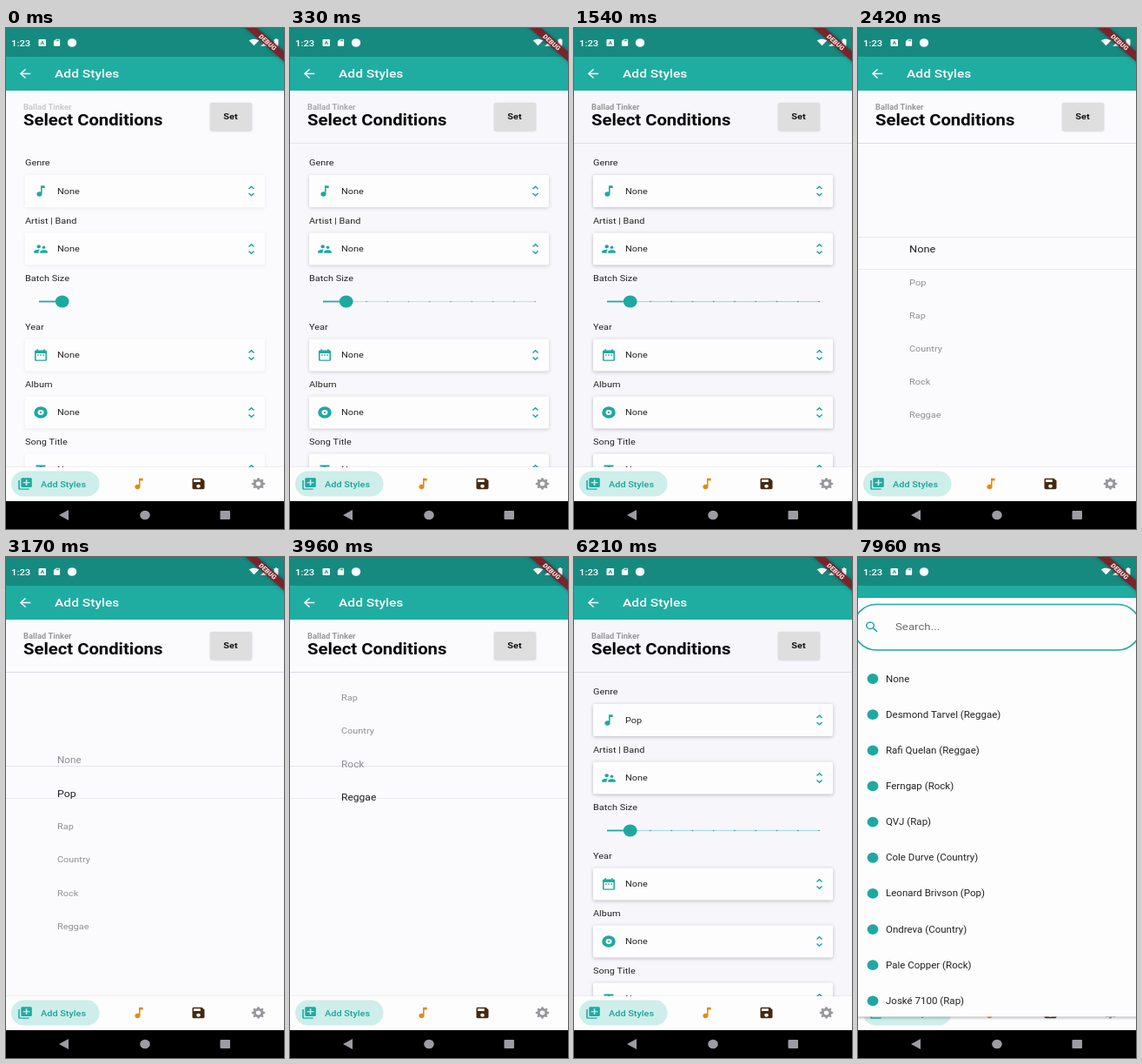
An HTML page with a canvas that plays this animation: 320 by 576 pixels, repeating every 8 s.

```html
<!DOCTYPE html>
<html lang="en">
<head>
<meta charset="utf-8">
<title>Add Styles</title>
<style>
html, body { margin: 0; width: 100%; height: 100%; overflow: hidden; background: #000; }
canvas { display: block; width: 320px; height: 576px; }
</style>
</head>
<body>
<canvas id="stage"></canvas>
<script>
const W = 320, H = 576, LOOP = 8000;
// The phone screen is 411 x 845 dp, squeezed into the stage.
const SX = W / 411, SY = H / 845;
const FONT = 'Roboto, "Open Sans", sans-serif';
const TEAL = '#1ea9a0', INK = '#232325';

const canvas = document.getElementById('stage');
const ctx = canvas.getContext('2d');
const dpr = window.devicePixelRatio || 1;
canvas.width = W * dpr;
canvas.height = H * dpr;

const ICONS = {
  back: 'M20 11H7.83l5.59-5.59L12 4l-8 8 8 8 1.41-1.41L7.83 13H20v-2z',
  note: 'M12 3v10.55c-.59-.34-1.27-.55-2-.55-2.21 0-4 1.79-4 4s1.79 4 4 4 4-1.79 4-4V7h4V3h-6z',
  people: 'M16.5 12a2.5 2.5 0 1 0 0-5a2.5 2.5 0 1 0 0 5zM9 11a3 3 0 1 0 0-6a3 3 0 1 0 0 6zm7.5 3c-1.83 0-5.5.92-5.5 2.75V19h11v-2.25c0-1.83-3.67-2.75-5.5-2.75zM9 13c-2.33 0-7 1.17-7 3.5V19h7v-2.25c0-.85.33-2.34 2.37-3.47C10.5 13.1 9.66 13 9 13z',
  date: 'M9 11H7v2h2zm4 0h-2v2h2zm4 0h-2v2h2zm2-7h-1V2h-2v2H8V2H6v2H5c-1.1 0-2 .9-2 2v14c0 1.1.9 2 2 2h14c1.1 0 2-.9 2-2V6c0-1.1-.9-2-2-2zm0 16H5V9h14z',
  album: 'M12 2a10 10 0 1 0 0 20a10 10 0 1 0 0-20zm0 5.5a4.5 4.5 0 1 1 0 9a4.5 4.5 0 1 1 0-9zm0 3a1.5 1.5 0 1 0 0 3a1.5 1.5 0 1 0 0-3z',
  title: 'M5 4v3h5.5v12h3V7H19V4z',
  unfold: 'M12 5.83L15.17 9l1.41-1.41L12 3 7.41 7.59 8.83 9zm0 12.34L8.83 15l-1.41 1.41L12 21l4.59-4.59L15.17 15z',
  add: 'M4 6H2v14c0 1.1.9 2 2 2h14v-2H4zm16-4H8c-1.1 0-2 .9-2 2v12c0 1.1.9 2 2 2h12c1.1 0 2-.9 2-2V4c0-1.1-.9-2-2-2zm-1 9h-4v4h-2v-4H9V9h4V5h2v4h4z',
  save: 'M17 3H5c-1.1 0-2 .9-2 2v14c0 1.1.9 2 2 2h14c1.1 0 2-.9 2-2V7zm-5 16a3 3 0 1 1 0-6a3 3 0 1 1 0 6zm3-10H5V5h10z',
  search: 'M15.5 14h-.8l-.3-.3A6.5 6.5 0 1 0 13.7 14.4l.3.3v.8l5 5L20.5 19zM9.5 14a4.5 4.5 0 1 1 0-9a4.5 4.5 0 1 1 0 9z',
  card: 'M18 2h-8L4 8v12c0 1.1.9 2 2 2h12c1.1 0 2-.9 2-2V4c0-1.1-.9-2-2-2zm-6 6h-2V4h2zm3 0h-2V4h2zm3 0h-2V4h2z',
  wifi: 'M12 21L0 7C7 2 17 2 24 7z',
  signal: 'M2 22h20V2z',
  battery: 'M16 4h-2V2h-4v2H8c-.6 0-1 .4-1 1v16c0 .6.4 1 1 1h8c.6 0 1-.4 1-1V5c0-.6-.4-1-1-1z',
  gear: gearPath(8)
};
for (const k in ICONS) ICONS[k] = new Path2D(ICONS[k]);

const FIELDS = [
  ['Genre', 155, 187.5, 'note'],
  ['Artist | Band', 221.5, 254, 'people'],
  ['Year', 343.5, 376, 'date'],
  ['Album', 409.5, 442, 'album'],
  ['Song Title', 475.5, 508, 'title']
];
const GENRES = ['None', 'Pop', 'Rap', 'Country', 'Rock', 'Reggae'];
const ARTISTS = ['None', 'Desmond Tarvel (Reggae)', 'Rafi Quelan (Reggae)', 'Ferngap (Rock)', 'QVJ (Rap)',
  'Cole Durve (Country)', 'Leonard Brivson (Pop)', 'Ondreva (Country)', 'Pale Copper (Rock)', 'Joské 7100 (Rap)'];
const PICK_Y = 258.5, STEP = 38.1;
// Height of the first genre over time while the finger drags the list.
const DRAG = [[2290, 258.5], [2670, 246], [3040, 246], [3170, 234], [3830, 104], [3880, 104], [4040, 68],
  [4250, 68], [4830, 181.5], [5000, 197], [5170, 197], [5330, 208], [5630, 208], [5830, 220]];

function gearPath(teeth) {
  let d = '';
  for (let i = 0; i < teeth * 4; i++) {
    const r = i % 4 < 2 ? 10 : 7.6;
    const a = (i - 0.5) / (teeth * 4) * Math.PI * 2;
    d += (i ? 'L' : 'M') + (12 + r * Math.sin(a)) + ' ' + (12 - r * Math.cos(a));
  }
  return d + 'zM12 8.4a3.6 3.6 0 1 0 0 7.2a3.6 3.6 0 1 0 0-7.2z';
}

const clamp = v => Math.max(0, Math.min(1, v));
const ramp = (t, a, b) => clamp((t - a) / (b - a));
const smooth = p => p * p * (3 - 2 * p);
const mix = (a, b, p) => a.map((v, i) => v + (b[i] - v) * p);
const rgb = c => `rgb(${c.map(Math.round).join(',')})`;

function listTop(t) {
  if (t <= DRAG[0][0]) return DRAG[0][1];
  for (let i = 1; i < DRAG.length; i++) {
    const [t0, y0] = DRAG[i - 1], [t1, y1] = DRAG[i];
    if (t < t1) return y0 + (y1 - y0) * ramp(t, t0, t1);
  }
  return DRAG[DRAG.length - 1][1];
}

function rect(x, y, w, h, color) {
  ctx.fillStyle = color;
  ctx.fillRect(x, y, w, h);
}

function round(x, y, w, h, r, color) {
  ctx.fillStyle = color;
  ctx.beginPath();
  ctx.roundRect(x, y, w, h, r);
  ctx.fill();
}

function oval(x, y, rx, ry, color) {
  ctx.fillStyle = color;
  ctx.beginPath();
  ctx.ellipse(x, y, rx, ry, 0, 0, Math.PI * 2);
  ctx.fill();
}

// Text centred vertically on y; size in dp.
function text(s, x, y, size, color, weight = 400, align = 'left') {
  ctx.save();
  ctx.translate(x, y);
  ctx.scale(SX, SY);
  ctx.font = `${weight} ${size}px ${FONT}`;
  ctx.textAlign = align;
  ctx.fillStyle = color;
  ctx.fillText(s, 0, size * 0.355);
  ctx.restore();
}

function icon(name, x, y, color, size = 24) {
  ctx.save();
  ctx.translate(x, y);
  ctx.scale(SX * size / 24, SY * size / 24);
  ctx.translate(-12, -12);
  ctx.fillStyle = color;
  ctx.fill(ICONS[name], 'evenodd');
  ctx.restore();
}

function withShadow(blur, dy, color, draw) {
  ctx.save();
  ctx.shadowColor = color;
  ctx.shadowBlur = blur * dpr;
  ctx.shadowOffsetY = dy * dpr;
  draw();
  ctx.restore();
}

function topBars() {
  rect(0, 0, W, 33, '#178a80');
  rect(0, 33, W, 39, '#1fada2');
  icon('back', 22, 52.5, '#fff');
  text('Add Styles', 56, 52.5, 20, '#fff', 500);

  text('1:23', 6, 17, 14.5, '#fff', 500);
  round(37.5, 13, 8.5, 8, 1, '#fff');
  text('A', 41.8, 17, 9, '#178a80', 700, 'center');
  icon('card', 58.5, 16.8, '#fff', 14);
  oval(76, 17, 5.2, 4.8, '#fff');
  icon('wifi', 285.5, 16.5, '#fff', 15);
  icon('signal', 298, 16.5, '#fff', 15);
  icon('battery', 311, 16.5, '#fff', 15);
}

function ribbon() {
  ctx.save();
  ctx.scale(SX, SY);
  ctx.translate(411, 0);
  ctx.rotate(Math.PI / 4);
  withShadow(4, 0, 'rgba(0,0,0,.4)', () => rect(-60, 28, 120, 12, 'rgba(132,30,38,.9)'));
  ctx.font = `900 10.2px ${FONT}`;
  ctx.textAlign = 'center';
  ctx.fillStyle = '#f2e4e4';
  ctx.fillText('DEBUG', 0, 37.7);
  ctx.restore();
}

function header(detail) {
  ctx.globalAlpha = 0.5 + detail / 2;
  text('Ballad Tinker', 20, 91.5, 12, '#98989b', 700);
  ctx.globalAlpha = 1;
  text('Select Conditions', 20, 106, 26, '#08080a', 700);
  withShadow(2, 0.5, 'rgba(60,60,75,.25)', () => round(235, 86, 48, 32, 2, '#dededf'));
  text('Set', 258.5, 102, 14, '#121214', 700, 'center');
  ctx.globalAlpha = detail;
  rect(0, 132, W, 1, '#dddde8');
  ctx.globalAlpha = 1;
}

function slider(detail) {
  const y = 314.5;
  text('Batch Size', 22, 287.5, 14, INK);
  ctx.globalAlpha = detail;
  rect(64, y - 0.6, 219, 1.2, '#abd9d8');
  for (let i = 2; i <= 10; i++) oval(39.5 + 24.25 * i, y, 0.9, 0.8, '#3f9c98');
  ctx.globalAlpha = 1;
  rect(38, y - 0.9, 27, 1.8, TEAL);
  oval(64.7, y, 7.9, 6.9, TEAL);
}

function form(genre, detail) {
  const edge = `rgba(50,50,70,${0.08 + 0.24 * detail})`;
  for (const [label, ly, cy, name] of FIELDS) {
    text(label, 22, ly, 14, INK);
    withShadow(4, 1, edge, () => round(22, cy - 18.5, 276, 37, 2, '#fdfdfe'));
    icon(name, 40, cy, TEAL);
    text(label === 'Genre' ? genre : 'None', 59, cy, 14, INK);
    icon('unfold', 282.5, cy, TEAL);
  }
  slider(detail);
}

function picker(t, bg) {
  rect(0, 133, W, 372, bg);
  rect(0, 240, W, 1, '#e4e4ee');
  rect(0, 277, W, 1, '#e9e9f1');
  ctx.save();
  ctx.beginPath();
  ctx.rect(0, 134, W, 370);
  ctx.clip();
  const top = listTop(t);
  GENRES.forEach((name, i) => {
    const y = top + i * STEP, d = Math.abs(y - PICK_Y);
    const grow = 1 + 0.2 * clamp(1 - d / STEP);
    text(name, 59, y, 14 * grow, d <= STEP / 2 ? '#1f1f21' : '#8e8e91');
  });
  ctx.restore();
}

function bottomBars() {
  withShadow(2, -0.5, 'rgba(70,70,90,.18)', () => rect(0, 505, W, 39, '#fdfdfe'));
  round(6, 509.5, 101.5, 29, 14.5, '#cdeeea');
  icon('add', 22, 524, TEAL);
  text('Add Styles', 40, 524.5, 14, '#1ca399', 500);
  icon('note', 153, 524, '#e08c12');
  icon('save', 221.5, 524, '#46290f');
  icon('gear', 290.5, 524, '#98989c');

  rect(0, 544, W, 32, '#000');
  const tone = '#9c9ca3';
  ctx.fillStyle = tone;
  ctx.beginPath();
  ctx.moveTo(61, 560);
  ctx.lineTo(72, 554);
  ctx.lineTo(72, 566);
  ctx.fill();
  oval(160, 560, 5.8, 5.3, tone);
  round(246.5, 555, 11.5, 10, 1, tone);
}

function artists() {
  withShadow(3, 1, 'rgba(50,50,70,.35)', () => rect(-4, 47, W + 8, 481.5, '#fdfdfe'));
  ctx.strokeStyle = TEAL;
  ctx.lineWidth = 1.6;
  ctx.beginPath();
  ctx.roundRect(-5, 54.5, 330, 52.5, 26);
  ctx.stroke();
  icon('search', 16, 80.5, TEAL);
  text('Search...', 43, 80, 17, '#6c6c70');
  ctx.save();
  ctx.beginPath();
  ctx.rect(0, 108, W, 420);
  ctx.clip();
  ARTISTS.forEach((name, i) => {
    const y = 140 + 41.15 * i;
    oval(17, y, 6.4, 5.9, TEAL);
    text(name, 32, y, 14.8, INK);
  });
  ctx.restore();
}

function draw(t) {
  const detail = t < 40 ? 0 : 0.4 + 0.6 * ramp(t, 40, 700);
  const open = smooth(ramp(t, 1690, 1880)) * (1 - smooth(ramp(t, 6020, 6210)));
  const found = smooth(ramp(t, 7730, 7930));
  const pale = [251, 251, 253];
  const bg = mix(mix(pale, [247, 247, 251], detail), pale, open);

  ctx.setTransform(dpr, 0, 0, dpr, 0, 0);
  ctx.globalAlpha = 1;
  rect(0, 0, W, H, rgb(bg));
  form(t < 5830 ? 'None' : 'Pop', detail);
  if (open > 0) {
    ctx.globalAlpha = open;
    picker(t, rgb(pale));
    ctx.globalAlpha = 1;
  }
  header(detail);
  topBars();
  bottomBars();
  if (found > 0) {
    ctx.globalAlpha = found;
    artists();
    ctx.globalAlpha = 1;
  }
  ribbon();
}

function tick() {
  draw(performance.now() % LOOP);
  requestAnimationFrame(tick);
}
tick();
</script>
</body>
</html>
```
